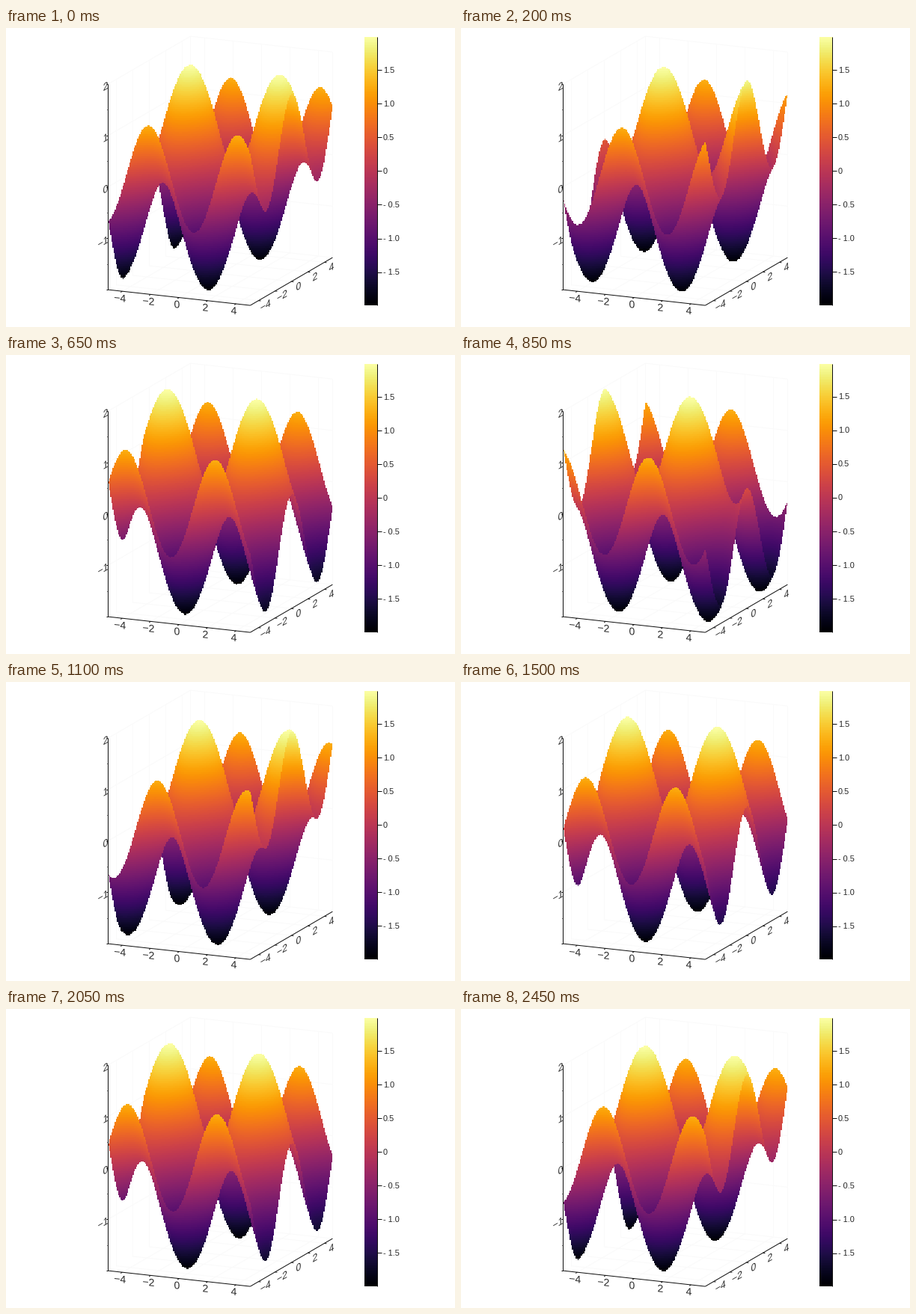
Write a matplotlib script that moves like this. It is 600 by 400 pixels and loops after 2500 ms.

```python
import numpy as np
import matplotlib.pyplot as plt
from matplotlib.animation import FuncAnimation
from matplotlib.patches import PathPatch
from matplotlib.path import Path
from matplotlib.textpath import TextPath

W, H, DPI = 600, 400, 100
FRAMES, INTERVAL = 50, 50
INK = "#101010"

# Parallel projection: screen steps per unit of x, y and z
ORIGIN = np.array([136.4, 350.1])
EX = np.array([19.0, 2.1])
EY = np.array([11.0, -6.4])
EZ = np.array([0.0, -68.75])

GRID = np.linspace(-5, 5, 40)
COS_Y = np.cos(GRID)

# The surface is drawn in coarse square cells, which gives it stepped edges
CELL = 1.5
LEFT, RIGHT, TOP, BOTTOM = 136, 437.5, 36, 366
BAR_TOP, BAR_BOTTOM = 12, 371
BAR_AXIS = 496.4


def project(x, y, z):
    return ORIGIN + (x + 5) * EX + (y + 5) * EY + (z + 2) * EZ


fig = plt.figure(figsize=(W / DPI, H / DPI), dpi=DPI, facecolor="white")
ax = fig.add_axes([0, 0, 1, 1])
ax.axis("off")


def line(p, q, color=INK, width=1.0, order=3):
    return ax.plot([p[0], q[0]], [p[1], q[1]], color=color, lw=width * 0.72,
                   zorder=order, solid_capstyle="butt")[0]


def tilted_text(pos, label, slant, align):
    """Text lying in a box plane: its baseline follows slant, its stems stay upright."""
    path = TextPath((0, 0), label, size=14, prop={"family": "Liberation Sans"})
    box = path.get_extents()
    x = path.vertices[:, 0] - (box.x0 + align * box.width)
    y = path.vertices[:, 1] - 4.9
    verts = np.column_stack([pos[0] + slant[0] * x, pos[1] + slant[1] * x - y])
    ax.add_patch(PathPatch(Path(verts, path.codes), fc="#2c2c2c", lw=0, zorder=4))


def name(v):
    return str(v).replace("-", "−")


def draw_box():
    faint = "#fafafa"
    for v in (-4, -2, 0, 2, 4, 5):
        line(project(v, -5, -2), project(v, 5, -2), faint, order=1)
        line(project(v, 5, -2), project(v, 5, 2), faint, order=1)
        line(project(-5, v, -2), project(5, v, -2), faint, order=1)
        line(project(-5, v, -2), project(-5, v, 2), faint, order=1)
    for v in (-1, 0, 1, 2):
        line(project(-5, -5, v), project(-5, 5, v), faint, order=1)
        line(project(-5, 5, v), project(5, 5, v), faint, order=1)

    line(project(-5, -5, -2), project(-5, -5, 2))
    line(project(-5, -5, -2), project(5, -5, -2))
    line(project(5, -5, -2), project(5, 5, -2))

    along_x, along_y = np.array([1.0, 0.11]), np.array([0.87, -0.5])
    for v in (-4, -2, 0, 2, 4):
        p = project(v, -5, -2)
        line(p, p - 2.6 * along_y)
        tilted_text(p + (-3, 8.9), name(v), along_x, 0.5)
        p = project(5, v, -2)
        line(p, p + 3 * along_x)
        tilted_text(p + (9.5, 6), name(v), along_y, 0.5)
    for v in np.arange(-2, 2.1, 0.5):
        p = project(-5, -5, v)
        line(p, p - (2.5 if v % 1 == 0 else 1.5, 0))
    for v in (-1, 0, 1, 2):
        tilted_text(project(-5, -5, v) + (-0.5, 1), name(v), along_y, 1)


def draw_bar():
    ramp = np.linspace(1, 0, 256)[:, None]
    ax.imshow(ramp, cmap="inferno", extent=(479, 497, BAR_BOTTOM, BAR_TOP),
              aspect="auto", interpolation="nearest", zorder=2)
    line((BAR_AXIS, BAR_TOP), (BAR_AXIS, BAR_BOTTOM))
    ticks = []
    for v in np.arange(-1.5, 1.6, 0.5):
        label = "0" if v == 0 else f"{v:.1f}".replace("-", "- ")
        text = ax.text(504, 0, label, family="Liberation Sans", size=11 * 0.72,
                       color="#262626", va="center_baseline", zorder=4)
        ticks.append((v, line((BAR_AXIS, 0), (502, 0)), text))
    return ticks


# One ray per cell column, sampled from the front of the box to the back
cols = np.clip(np.arange(LEFT, RIGHT, CELL) + CELL / 2 - ORIGIN[0], 0, 300)
rows = np.arange(TOP, BOTTOM, CELL) + CELL / 2
near = np.maximum(0, (cols - 10 * EX[0]) / EY[0])
far = np.minimum(10, cols / EY[0])
ray_y = near[:, None] + (far - near)[:, None] * np.linspace(0, 1, 180)
ray_x = (cols[:, None] - EY[0] * ray_y) / EX[0]
ray_floor = ORIGIN[1] + EX[1] * ray_x + EY[1] * ray_y
ray_cos = np.interp(ray_y - 5, GRID, COS_Y)


def render(sin_x, lo, hi):
    z = np.interp(ray_x - 5, GRID, sin_x) + ray_cos
    s = ray_floor + EZ[1] * (z + 2)
    below = s[:, None, :] <= rows[None, :, None]
    cross = below[..., 1:] != below[..., :-1]
    hit = cross.argmax(axis=2)
    c = np.arange(len(cols))[:, None]
    seen = np.take_along_axis(cross, hit[..., None], 2)[..., 0]
    s0, s1 = s[c, hit], s[c, hit + 1]
    t = np.where(seen, (rows - s0) / np.where(s1 == s0, 1, s1 - s0), 0)
    depth_z = z[c, hit] * (1 - t) + z[c, hit + 1] * t
    rgba = plt.cm.inferno((depth_z - lo) / (hi - lo))
    rgba[..., 3] = seen
    return rgba.transpose(1, 0, 2)


draw_box()
bar_ticks = draw_bar()
surface = ax.imshow(np.zeros((len(rows), len(cols), 4)),
                    extent=(LEFT, RIGHT, BOTTOM, TOP), aspect="auto",
                    interpolation="nearest", zorder=2)
ax.set_xlim(0, W)
ax.set_ylim(H, 0)


def update(i):
    phase = 10 * np.cos(2 * np.pi * i / (FRAMES - 1))
    sin_x = np.sin(GRID + phase)
    lo, hi = sin_x.min() + COS_Y.min(), sin_x.max() + COS_Y.max()
    surface.set_data(render(sin_x, lo, hi))
    for v, mark, text in bar_ticks:
        y = BAR_TOP + (hi - v) / (hi - lo) * (BAR_BOTTOM - BAR_TOP)
        mark.set_ydata([y, y])
        text.set_y(y - 0.5)
    return [surface]


anim = FuncAnimation(fig, update, frames=FRAMES, interval=INTERVAL, repeat=True)
plt.show()
```
